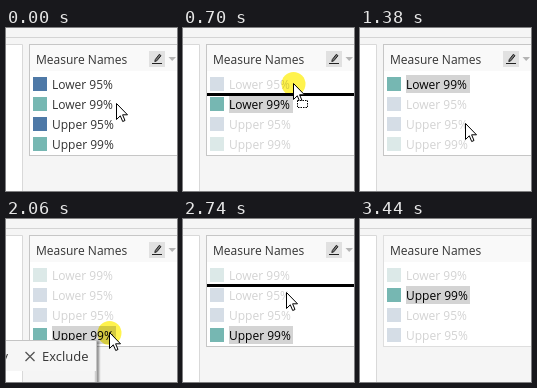
Write an HTML page that moves like this. It is 171 px wide and 163 px high and loops after 3.77 s.

```html
<!DOCTYPE html>
<html lang="en">
<head>
<meta charset="utf-8">
<title>Reordering a legend</title>
<style>
  html, body { margin: 0; width: 100%; height: 100%; overflow: hidden; background: #f5f5f5; }
  svg { display: block; width: 100vw; height: 100vh; }
  text { font: 12px "Open Sans", "Noto Sans", sans-serif; fill: #333; }
  .menu text { font-size: 13px; }
  #halo { mix-blend-mode: multiply; }
</style>
</head>
<body>
<svg id="stage" viewBox="0 0 171 163">
  <defs>
    <filter id="shadow" x="-20%" y="-20%" width="140%" height="150%">
      <feGaussianBlur stdDeviation="1.3"/>
    </filter>
  </defs>
  <rect width="171" height="163" fill="#f5f5f5"/>
  <path d="M0 9.5H171" stroke="#d4d4d4"/>
  <path d="M-1 16.5H16.5V164H-1Z" fill="#fff" stroke="#d9d9d9"/>
  <rect id="card" x="23.5" y="16.5" width="160" height="111" fill="#fff"/>
  <rect x="24" y="17" width="147" height="26" fill="#f9f9f9"/>
  <text x="30" y="36">Measure Names</text>
  <g id="tools">
    <rect x="143" y="23" width="16" height="16" fill="#e1e1e1"/>
    <path d="M149.3 31.5L153.3 26.3L155 27.7L150.8 32.8L148.8 33.5Z" fill="#777" stroke="#222"/>
    <path d="M146 35.5H156" stroke="#222"/>
    <path d="M162.5 29H170L166.2 33Z" fill="#b4b4b4"/>
  </g>
  <g id="rows"></g>
  <rect id="line" x="24" width="147"/>
  <g id="menu" class="menu">
    <path d="M-20 84H100V150H-20ZM-20 84V147H97V84Z" fill-rule="evenodd" opacity=".45" filter="url(#shadow)"/>
    <rect x="-20" y="83" width="117" height="31" fill="#f6f6f6"/>
    <path d="M-20 83.5H97.5V147.5H-20" fill="none" stroke="#c4c4c4"/>
    <text x="9" y="104" text-anchor="end">Keep Only</text>
    <path d="M26.5 95L35.5 104M35.5 95L26.5 104" stroke="#555" stroke-width="1.3"/>
    <text x="43" y="104">Exclude</text>
  </g>
  <circle id="halo" r="12" fill="#fff34d"/>
  <g id="cursor">
    <path d="M.5 .5V16.5L4.3 12.8L6.7 18.5L9 17.5L6.6 11.8H11.5Z" fill="#fff" stroke="#000"/>
    <g id="badge">
      <rect x="4.5" y="17.5" width="10" height="7" fill="#fff" stroke="#000" stroke-dasharray="1.5 1"/>
    </g>
  </g>
</svg>
<script>
const $ = id => document.getElementById(id);
const LOOP = 3770;
const PITCH = 20;
const BLUE = { on: "#4e79a7", off: "#d5dde6" };
const TEAL = { on: "#76b7b2", off: "#dce9e8" };
const items = {
  L95: ["Lower 95%", BLUE], L99: ["Lower 99%", TEAL],
  U95: ["Upper 95%", BLUE], U99: ["Upper 99%", TEAL]
};
const start = ["L95", "L99", "U95", "U99"];
const middle = ["L99", "L95", "U95", "U99"];
const end = ["L99", "U99", "L95", "U95"];

// Each step holds until the next; lit counts trailing rows not yet dimmed.
const steps = [
  { at: 0, order: start, cur: [110, 75] },
  { at: 350, order: start, pick: "L99", cur: [110, 75], halo: true, menu: [0, 0], lit: 1 },
  { at: 700, order: start, pick: "L99", cur: [110, 55], halo: true, badge: true, line: [65, 3] },
  { at: 1030, order: start, pick: "L99", cur: [110, 52], badge: true, line: [46, 2] },
  { at: 1380, order: middle, pick: "L99", cur: [105, 95] },
  { at: 1730, order: middle, pick: "L99", cur: [103, 113] },
  { at: 2060, order: middle, pick: "U99", cur: [103, 113], halo: true, menu: [-7, 38] },
  { at: 2410, order: middle, pick: "U99", cur: [103, 74], halo: true, badge: true, line: [65, 3] },
  { at: 2740, order: middle, pick: "U99", cur: [103, 73], line: [65, 3] },
  { at: 3090, order: end, pick: "U99", cur: [129, 146], away: true },
  { at: 3440, order: end, pick: "U99", away: true }
];

function set(el, attrs) {
  for (const key in attrs) el.setAttribute(key, attrs[key]);
}

function add(parent, tag, attrs, text = "") {
  const el = document.createElementNS("http://www.w3.org/2000/svg", tag);
  set(el, attrs);
  el.textContent = text;
  parent.append(el);
}

function show(id, on) {
  $(id).style.display = on ? "" : "none";
}

function drawRows({ order, pick, lit = 0 }) {
  const rows = $("rows");
  rows.replaceChildren();
  order.forEach((key, i) => {
    const [label, color] = items[key];
    const y = i * PITCH;
    const picked = key === pick;
    const bright = !pick || picked || i >= order.length - lit;
    add(rows, "rect", { x: 27, y: 49 + y, width: 14, height: 14, fill: bright ? color.on : color.off });
    if (picked) add(rows, "rect", { x: 46, y: 47 + y, width: 64, height: 18, fill: "#d4d4d4" });
    const ink = picked ? "#000" : bright ? "#333" : "#d3d3d3";
    add(rows, "text", { x: 46, y: 61 + y, style: `fill:${ink}` }, label);
  });
}

function draw(step) {
  const { cur, halo, menu, line, badge, away } = step;
  drawRows(step);
  set($("card"), { stroke: away ? "#dedede" : "#c6c6c6" });
  show("tools", !away);
  show("line", line);
  if (line) set($("line"), { y: line[0], height: line[1] });
  show("menu", menu);
  if (menu) set($("menu"), { transform: `translate(${menu})` });
  show("halo", halo);
  if (halo) set($("halo"), { cx: cur[0] + 0.5, cy: cur[1] + 1 });
  show("cursor", cur);
  if (cur) set($("cursor"), { transform: `translate(${cur})` });
  show("badge", badge);
}

let current;
const origin = performance.now();
function tick() {
  const t = (performance.now() - origin) % LOOP;
  const step = steps.findLast(s => s.at <= t);
  if (step !== current) draw(current = step);
  requestAnimationFrame(tick);
}
tick();
</script>
</body>
</html>
```
